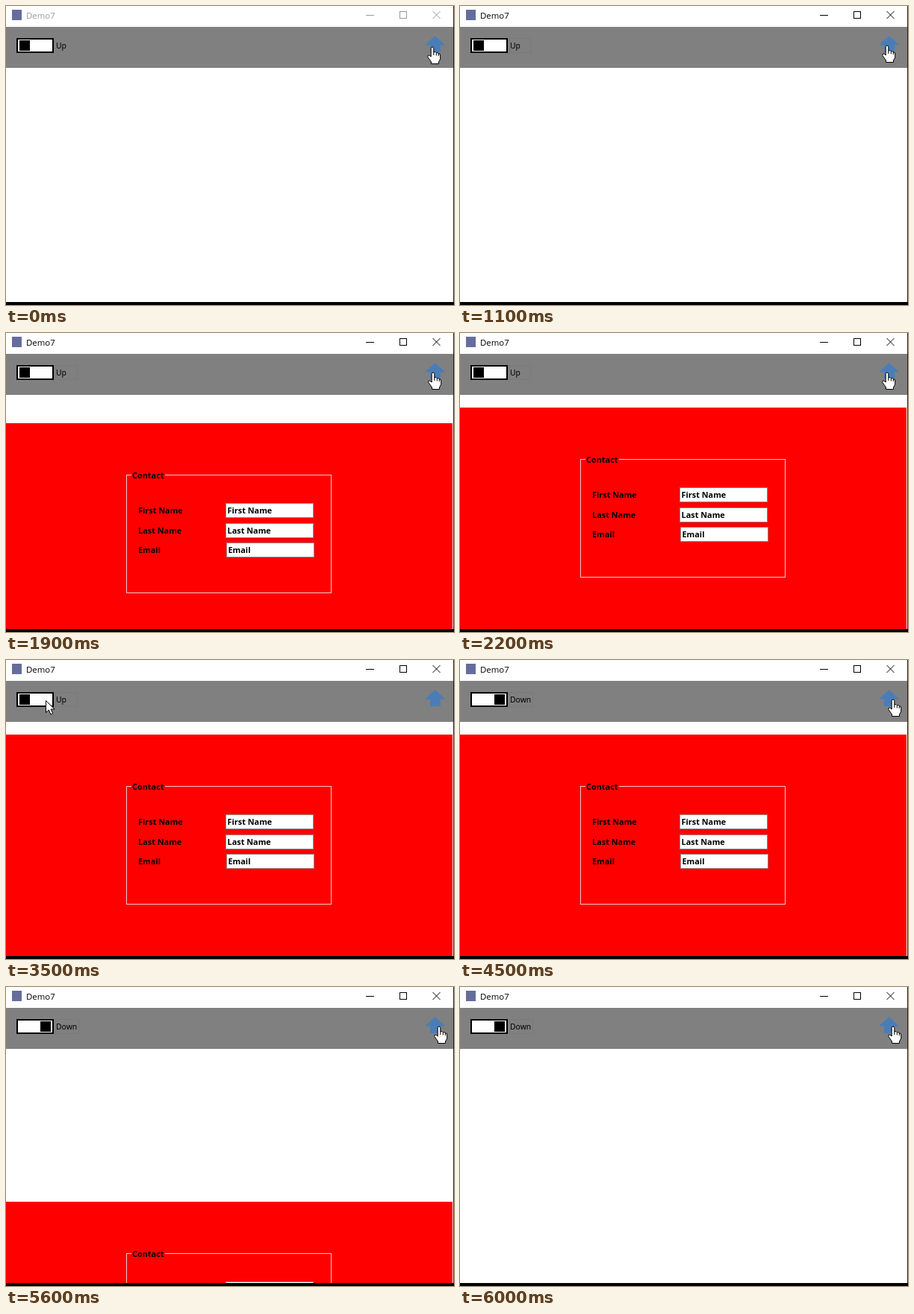
These frames come from a looping animation (600x401 px, 7100 ms). An HTML page with a canvas:

```html
<!DOCTYPE html>
<html lang="en">
<head>
<meta charset="utf-8">
<title>Demo7</title>
<style>
html, body { margin: 0; width: 100%; height: 100%; overflow: hidden; background: #fff; }
canvas { display: block; width: 600px; height: 401px; }
</style>
</head>
<body>
<canvas id="stage" width="600" height="401"></canvas>
<script>
const ctx = document.getElementById('stage').getContext('2d');
const LOOP = 7100, STEP = 100;
const PANEL_TOP = 100, PANEL_BOTTOM = 397, SLIDE = 850;
const ACTIVATE = 1000, TOGGLE = 3600;

const ICON = new Path2D('M574.5 40L588.5 52.5H582L582 62H568V52.5H561Z');
const ARROW = new Path2D('M.5 .5V16.5L4.3 13 7 19 9.7 17.8 7.1 12H12Z');
// Pointing hand, with the fingertip at the origin.
const HAND = new Path2D('M-1.8 1.6Q-1.8 0 0 0T1.8 1.6V7Q4.5 5.6 5.3 7.8 7.6 6.8 8.3 9 10.7 8.5 10.7 11V16L8.5 20V22.5H-1.5V20L-6 13.5Q-6.8 11 -4.3 11L-1.8 13Z');
const KNUCKLES = new Path2D('M1.8 7V11M5.3 7.8V11.5M8.3 9V12');

// time, x, y of the pointer tip
const POINTER = [
  [0, 571, 55], [300, 571, 56], [500, 571, 55], [600, 572, 53],
  [2300, 572, 53], [2500, 540, 58], [2800, 300, 64], [3100, 75, 57],
  [3200, 53, 54], [3600, 53, 54], [3800, 190, 57], [4000, 440, 59],
  [4200, 578, 52], [4300, 579, 52], [4400, 579, 52], [4500, 580, 53], [LOOP, 580, 53]
];

const clamp = v => Math.max(0, Math.min(1, v));

function pointerAt(t) {
  const i = POINTER.findIndex(k => k[0] > t);
  const [t0, x0, y0] = POINTER[i - 1], [t1, x1, y1] = POINTER[i];
  const p = (t - t0) / (t1 - t0);
  return [Math.round(x0 + (x1 - x0) * p), Math.round(y0 + (y1 - y0) * p)];
}

function panelTop(t) {
  const travel = PANEL_BOTTOM - PANEL_TOP;
  if (t < 5200) return Math.round(PANEL_BOTTOM - travel * clamp((t - 1110) / SLIDE));
  return Math.round(PANEL_TOP + travel * clamp((t - 5063) / SLIDE));
}

function rect(x, y, w, h, color) {
  ctx.fillStyle = color;
  ctx.fillRect(x, y, w, h);
}

function frame(x, y, w, h, color) {
  ctx.strokeStyle = color;
  ctx.lineWidth = 1;
  ctx.strokeRect(x + .5, y + .5, w - 1, h - 1);
}

function text(str, x, y, font, color = '#000') {
  ctx.font = font;
  ctx.fillStyle = color;
  ctx.fillText(str, x, y);
}

const BOLD = 'bold 10.9px "Noto Sans", sans-serif';

function drawTitleBar(active) {
  const color = active ? '#000' : '#999';
  rect(8, 5, 13, 14, '#666d9d');
  text('Demo7', 27, 17, '11.4px "Open Sans", sans-serif', color);
  rect(482, 12, 11, 1, color);
  frame(527, 7, 10, 10, color);
  ctx.beginPath();
  ctx.moveTo(571.5, 7);
  ctx.lineTo(581.5, 17);
  ctx.moveTo(581.5, 7);
  ctx.lineTo(571.5, 17);
  ctx.stroke();
}

function drawToolbar(down, active) {
  rect(0, 28, 599, 55, '#808080');
  rect(14, 43, 50, 20, '#000');
  rect(16, 45, 46, 16, '#fff');
  rect(down ? 46 : 18, 46, 14, 14, '#000');
  if (active) frame(66, 43, down ? 32 : 30, 20, '#7a7a7a');
  text(down ? 'Down' : 'Up', 67, 57, '10.4px "Noto Sans", sans-serif');
  ctx.fillStyle = '#4a7db8';
  ctx.fill(ICON);
}

function drawField(label, x, y) {
  text(label, 177, y + 14, BOLD);
  rect(x, y, 118, 20, '#fff');
  frame(x, y, 118, 20, '#9a8484');
  text(label, x + 2.5, y + 14, BOLD);
}

function drawPanel(top) {
  if (top >= PANEL_BOTTOM) return;
  ctx.save();
  ctx.beginPath();
  ctx.rect(0, top, 599, PANEL_BOTTOM - top);
  ctx.clip();
  ctx.translate(0, top);
  rect(0, 0, 598, 297, '#f00');
  frame(161, 69, 275, 159, '#f4caca');
  rect(168, 68, 45, 3, '#f00');
  text('Contact', 169, 74, BOLD);
  drawField('First Name', 294, 107);
  drawField('Last Name', 294, 134);
  drawField('Email', 295, 160);
  ctx.restore();
}

function drawPointer(x, y) {
  const overIcon = x > 561 && x < 588 && y > 40 && y < 63;
  ctx.save();
  ctx.translate(x, y);
  ctx.fillStyle = '#fff';
  ctx.strokeStyle = '#000';
  ctx.lineWidth = 1;
  ctx.lineJoin = 'round';
  ctx.fill(overIcon ? HAND : ARROW);
  ctx.stroke(overIcon ? HAND : ARROW);
  if (overIcon) ctx.stroke(KNUCKLES);
  ctx.restore();
}

function draw(now) {
  const t = Math.floor((now % LOOP) / STEP) * STEP;
  const active = t >= ACTIVATE;
  rect(0, 0, 600, 401, '#fff');
  drawTitleBar(active);
  drawToolbar(t >= TOGGLE, active);
  drawPanel(panelTop(t));
  rect(599, 0, 1, 401, '#222');
  rect(0, 397, 600, 4, '#000');
  drawPointer(...pointerAt(t));
}

const start = performance.now();
function tick() {
  draw(performance.now() - start);
  requestAnimationFrame(tick);
}
tick();
</script>
</body>
</html>
```
